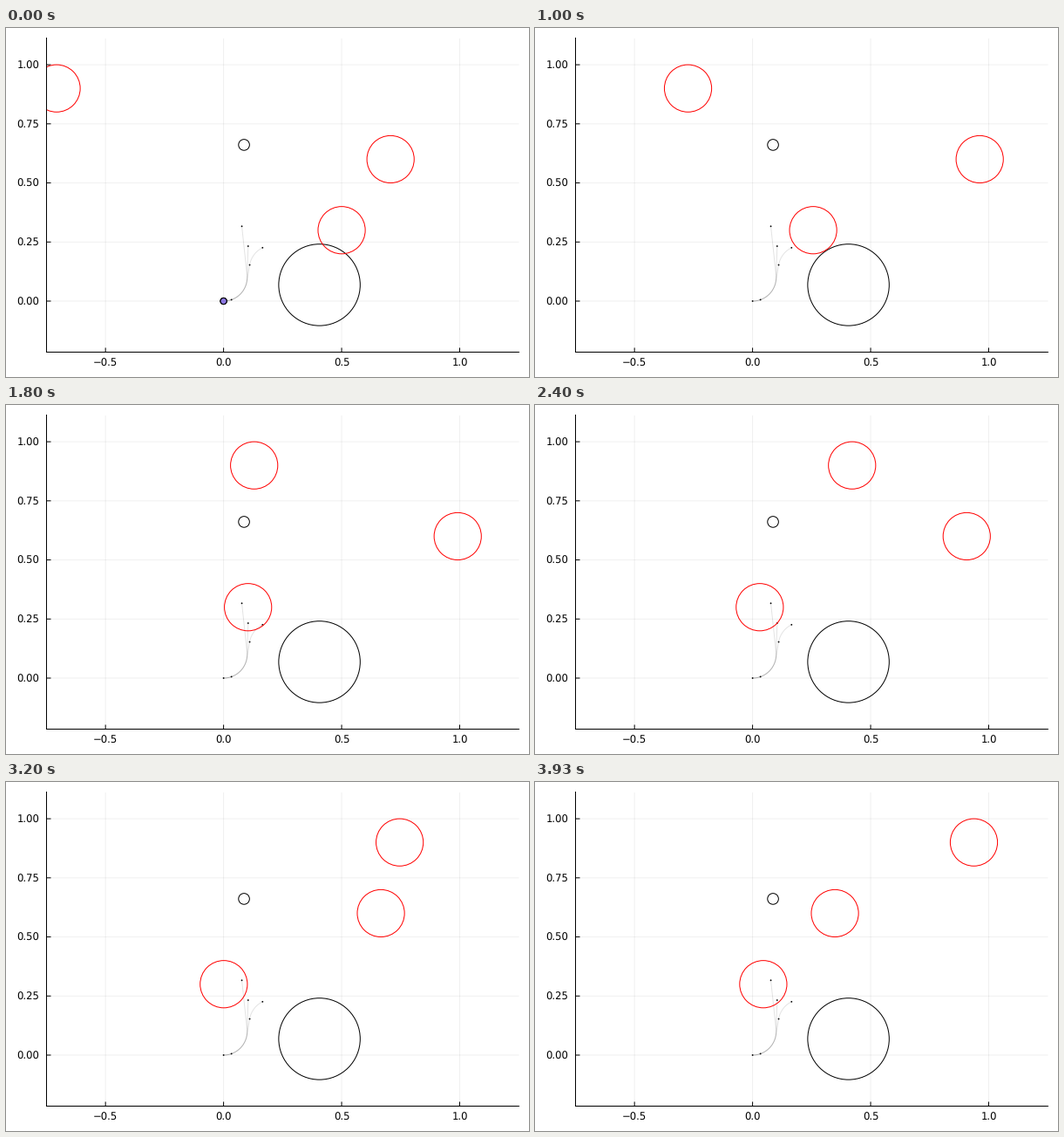
Write a matplotlib script that moves like this. It is 600 px wide and 400 px high and loops after 4 s.

```python
import matplotlib.pyplot as plt
import numpy as np
from matplotlib.animation import FuncAnimation
from matplotlib.patches import Circle

W, H, DPI = 600, 400, 100
PX = 72 / DPI                      # one pixel in points
POSES, STEPS, LOOP_MS = 60, 200, 4000
DURATION = 2.0                     # simulated time in one loop
TURN = 0.1                         # turning radius

# plot area in pixels, and the pixel position of the data origin
LEFT, RIGHT, TOP, BOTTOM = 46.5, 588.5, 11.5, 371.5
X0, Y0, UNIT = 249.6, 313.0, 270.9
X_MIN, X_MAX = (LEFT - X0) / UNIT, (RIGHT - X0) / UNIT
Y_MIN, Y_MAX = (Y0 - BOTTOM) / UNIT, (Y0 - TOP) / UNIT
X_TICKS = [-0.5, 0, 0.5, 1]
Y_TICKS = [0, 0.25, 0.5, 0.75, 1]

plt.rcParams.update({"font.family": "DejaVu Sans", "font.size": 8.4,
                     "text.hinting": "none"})


def arc(angle):
    """Turn by a signed angle: (length, curvature)."""
    return abs(angle) * TURN, np.sign(angle) / TURN


def straight(length):
    return length, 0.0


def locate(route, s):
    """Point at arc length s on a route that starts at the origin, heading right."""
    x = y = heading = 0.0
    for length, k in route:
        d = min(s, length)
        if k:
            end = heading + k * d
            x += (np.sin(end) - np.sin(heading)) / k
            y += (np.cos(heading) - np.cos(end)) / k
            heading = end
        else:
            x += d * np.cos(heading)
            y += d * np.sin(heading)
        s -= d
    return x, y


def route_length(route):
    return sum(length for length, _ in route)


UP = np.pi / 2
ROUTES = [
    [arc(UP - 0.03), straight(0.1355)],
    [arc(UP + 0.107), straight(0.207)],
    [arc(UP - 0.17), straight(0.0709), arc(-0.945)],
]


def hazards(t):
    """Centres of the moving circles at time t."""
    return [
        (0.5 - 0.5 * np.sin(t), 0.3),
        (np.sin(t + np.pi / 4), 0.6),
        (np.sin(t - np.pi / 4), 0.9),
    ]


fig = plt.figure(figsize=(W / DPI, H / DPI), dpi=DPI, facecolor="white")
ax = fig.add_axes([LEFT / W, 1 - BOTTOM / H, (RIGHT - LEFT) / W, (BOTTOM - TOP) / H])
ax.set_xlim(X_MIN, X_MAX)
ax.set_ylim(Y_MIN, Y_MAX)
ax.set_xticks(X_TICKS)
ax.set_yticks(Y_TICKS)
ax.tick_params(length=0)
ax.tick_params(axis="x", pad=5.2)
ax.tick_params(axis="y", pad=5.8)
ax.spines[["top", "right"]].set_visible(False)
for side in ("left", "bottom"):
    ax.spines[side].set(linewidth=PX, snap=False)


def rule(xs, ys, **style):
    ax.plot(xs, ys, color="black", lw=PX, snap=False, solid_capstyle="butt", **style)


TICK = 5 / UNIT
GRID = dict(alpha=0.06, zorder=1)
for x in X_TICKS:
    rule([x, x], [Y_MIN, Y_MAX], **GRID)
    rule([x, x], [Y_MIN, Y_MIN + TICK], zorder=2)
for y in Y_TICKS:
    rule([X_MIN, X_MAX], [y, y], **GRID)
    rule([X_MIN, X_MIN + TICK], [y, y], zorder=2)


def disc(center, radius, z, fill="none", edge="none"):
    return ax.add_patch(Circle(center, radius, fc=fill, ec=edge, lw=PX, zorder=z))


disc((0.406, 0.0686), 0.1725, 2, edge="black")
disc((0.0866, 0.661), 0.0232, 2, edge="black")
reds = [disc(c, TURN, 3, edge="red") for c in hazards(0)]

for route in ROUTES:
    points = [locate(route, s) for s in np.linspace(0, route_length(route), 80)]
    rule(*zip(*points), alpha=0.11, zorder=2)

nodes = [locate(ROUTES[0], 0), locate(ROUTES[0], 0.034), locate(ROUTES[2], 0.211)]
nodes += [locate(route, route_length(route)) for route in ROUTES]
for node in nodes:
    disc(node, 0.9 / UNIT, 2.5, fill="black")

agents = [disc((0, 0), 3.6 / UNIT, 4, fill="#8a76e0", edge="black") for _ in ROUTES]


def update(step):
    # poses change 15 times a second, on a finer clock
    pose = int((step + 0.75) * POSES / STEPS)
    t = DURATION * pose / (POSES - 1)
    for circle, center in zip(reds, hazards(t)):
        circle.center = center
    for agent, route in zip(agents, ROUTES):
        agent.center = locate(route, t)
        agent.set_visible(t <= route_length(route))
    return reds + agents


anim = FuncAnimation(fig, update, frames=STEPS, interval=LOOP_MS / STEPS,
                     repeat=True, repeat_delay=0, blit=False)
plt.show()
```
